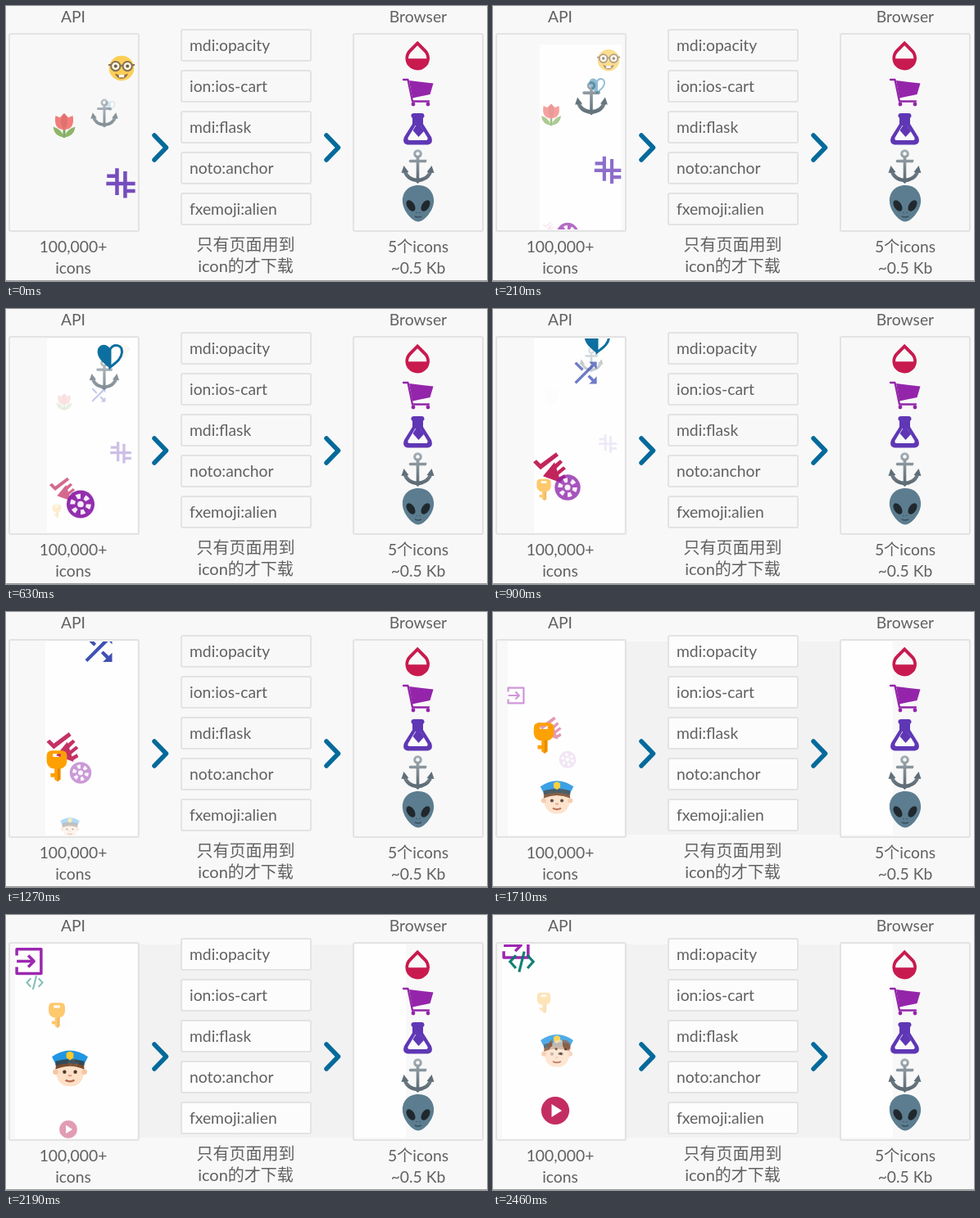
Animation, 587 px wide and 336 px high, one loop 2.56 s. Source, as an HTML page:

```html
<!DOCTYPE html>
<html lang="zh">
<head>
<meta charset="utf-8">
<title>Icons on demand</title>
<style>
  html, body { margin: 0; width: 100%; height: 100%; overflow: hidden; background: #f8f8f8; }
  svg { display: block; }
  text { font: 19.3px Lato, "Noto Sans CJK SC", "Noto Sans CJK", sans-serif; fill: #616161; }
  .mid text { text-anchor: middle; }
  .cjk text { font-size: 20px; }
  .box { fill: none; stroke: #e3e3e3; stroke-width: 2; }
  .lit .row { fill: #fcfcfc; }
  .band { visibility: hidden; }
  .lit .band { visibility: visible; }
  .line { fill: none; stroke: currentColor; stroke-linecap: round; stroke-linejoin: round; }
</style>
</head>
<body>
<svg id="stage" width="587" height="336" viewBox="0 0 587 336">
  <defs>
    <clipPath id="panel"><rect x="5" y="36" width="156" height="237"/></clipPath>
    <linearGradient id="steel" gradientUnits="userSpaceOnUse" x1="0" y1="-20" x2="0" y2="20">
      <stop offset="0" stop-color="#a3aeb5"/><stop offset="1" stop-color="#56656f"/>
    </linearGradient>

    <g id="nerd">
      <circle r="19" fill="#fcc535"/>
      <g fill="#fff6dc" stroke="#6b5130" stroke-width="2.5">
        <circle cx="-9" cy="-3" r="7"/><circle cx="9" cy="-3" r="7"/>
        <path d="M-20 -5h4M16 -5h4M-2 -4h4"/>
      </g>
      <g fill="#4e3b27"><circle cx="-9" cy="-3" r="2.5"/><circle cx="9" cy="-3" r="2.5"/></g>
      <path d="M-10 8Q0 13 10 8Q7 16 0 16T-10 8" fill="#7a4a20"/>
      <path d="M-4 10h8v4h-8z" fill="#fff"/>
    </g>
    <g id="tulip">
      <path d="M-2 0h4v20h-4z" fill="#558b2f"/>
      <path d="M0 19Q-16 18 -18 2Q-5 5 0 19Q5 5 18 2Q16 18 0 19" fill="#689f38"/>
      <path d="M-14 -16L-7 -13L0 -20L7 -13L14 -16Q18 6 0 7Q-18 6 -14 -16" fill="#ef5350"/>
      <path d="M0 -20Q11 -7 0 7Q-11 -7 0 -20" fill="#d9443f"/>
    </g>
    <g id="anchor" fill="none" stroke="url(#steel)" stroke-width="4.5">
      <circle cy="-15.5" r="3.8" stroke-width="3"/>
      <path d="M-9 -6.5H9L9 -6.4" stroke-width="3.6" stroke-linecap="round"/>
      <path d="M-1.8 -12H1.8V17H-1.8z" fill="url(#steel)" stroke="none"/>
      <path d="M-16 5Q-13 16 0 17Q13 16 16 5"/>
      <path d="M-20 8L-17 -1L-11 7zM20 8L17 -1L11 7zM-6 16H6L0 21z" fill="#5f6f79" stroke="none"/>
    </g>
    <g id="heart" color="#0d6f9f">
      <path d="M0 -11C-5 -20 -19 -18 -18 -5C-17 5 -7 11 0 18z" fill="currentColor"/>
      <path d="M0 -10C5 -19 18 -17 17 -5C16 5 7 10 0 16z" fill="#fff" stroke="currentColor" stroke-width="3.5"/>
    </g>
    <g id="align" class="line" color="#673ab7" stroke-width="5">
      <path d="M-5 -17V14M6 -13V18M-16 -9H-5M-17 1H17M6 11H17" stroke-linecap="square"/>
    </g>
    <g id="check" fill="#c2255c">
      <path d="M-18 -6L-14 -9L-9 -4L10 -18L13 -14L-9 3z"/>
      <path d="M-6 11L8 -6L16 19z"/>
      <path d="M4 0L15 -9L18 -6L8 4zM9 7L19 -1L22 2L11 11zM11 14L20 9L22 13L14 18z"/>
    </g>
    <g id="wheel" fill="none" stroke="#f7eefa">
      <circle r="20" fill="#8e24aa" stroke="none"/>
      <circle r="11.5" stroke-width="7" stroke-dasharray="1" pathLength="12"/>
      <circle r="4.5" fill="#f7eefa" stroke="none"/>
    </g>
    <path id="shuffle" fill="#3f51b5" transform="scale(2.5) translate(-12 -12)" d="M10.6 9.2L5.4 4L4 5.4L9.2 10.6zM14.5 4L16.5 6L4 18.6L5.4 20L18 7.5L20 9.5V4zM14.8 13.4L13.4 14.8L16.5 18L14.5 20H20V14.5L18 16.5z"/>
    <g id="key" fill="#ffa000">
      <path fill-rule="evenodd" d="M-6 -20H6Q13 -20 13 -13V-6Q12 1 6 3H5V17L1 20L-3 17V14H-8V9H-3V3H-6Q-12 1 -13 -6V-13Q-13 -20 -6 -20M-5 -16V-12H5V-16z"/>
      <path d="M1 3H4V17L1 20z" fill="#e68900"/>
    </g>
    <g id="police">
      <path d="M-16 -8Q-18 20 0 20T16 -8z" fill="#ffe0c7"/>
      <g fill="#f5c6a5"><circle cx="-16" cy="4" r="3"/><circle cx="16" cy="4" r="3"/></g>
      <path d="M-15 -6Q0 -13 15 -6L16 1Q0 -6 -16 1z" fill="#7a4b2d"/>
      <path d="M-16 -5L-20 -13Q0 -27 20 -13L16 -5Q0 -11 -16 -5" fill="#2196e3"/>
      <path d="M-16 -8Q0 -13 16 -8V-3Q0 -8 -16 -3z" fill="#334a59"/>
      <path d="M-4 -17L0 -19L4 -17V-12L0 -9L-4 -12z" fill="#ffca28"/>
      <g fill="#4e3a30"><circle cx="-6" cy="4" r="2"/><circle cx="6" cy="4" r="2"/></g>
      <path d="M-2 8H2" stroke="#e4a184" stroke-width="2"/>
      <path d="M-5 13Q0 16 5 13" fill="none" stroke="#b5654a" stroke-width="2"/>
    </g>
    <g id="login" class="line" color="#9c27b0" stroke-width="4">
      <path d="M-17 -8V-17H17V17H-17V8M-17 0H6M-1 -8L7 0L-1 8" stroke-linecap="butt"/>
    </g>
    <g id="code" class="line" color="#00796b" stroke-width="4">
      <path d="M-9 -10L-18 0L-9 10M9 -10L18 0L9 10M4 -16L-4 16" stroke-linecap="butt" stroke-linejoin="miter"/>
    </g>
    <g id="dog">
      <ellipse cy="3" rx="16" ry="16" fill="#fbe6d6"/>
      <path d="M3 -13Q16 -14 16 0Q9 7 4 -3z" fill="#a3582b"/>
      <path d="M-12 -13Q-20 -10 -18 2L-12 -4z" fill="#a3582b"/>
      <g fill="#3b2a22"><circle cx="-6" cy="1" r="2"/><circle cx="8" cy="1" r="2"/><ellipse cy="8" rx="3" ry="2"/></g>
    </g>
    <g id="play"><circle r="19" fill="#c2255c"/><path d="M-5 -9L9 0L-5 9z" fill="#fff"/></g>
  </defs>

  <rect width="587" height="336" fill="#f8f8f8"/>
  <g class="band">
    <path d="M163 36H423V272H163z" fill="#f2f2f2"/>
    <path d="M425 36H488V272H425z" fill="#fefefe"/>
  </g>
  <rect id="wash" fill="#fefefe"/>
  <g id="flow" clip-path="url(#panel)"></g>
  <rect class="box" x="4" y="34" width="158" height="241" rx="2"/>
  <rect class="box" x="424" y="34" width="158" height="241" rx="2"/>
  <g id="rows"></g>

  <g class="line" color="#036a9b" stroke-width="5.5">
    <path d="M181 158L195.5 173L181 188M391 158L405.5 173L391 188"/>
  </g>

  <g class="mid">
    <text x="82" y="20">API</text>
    <text x="503" y="20">Browser</text>
    <text x="82" y="301">100,000+</text>
    <text x="82" y="327">icons</text>
    <text x="503" y="301">5个icons</text>
    <text x="503" y="327">~0.5 Kb</text>
    <g class="cjk">
      <text x="292.5" y="299">只有页面用到</text>
      <text x="292.5" y="325">icon的才下载</text>
    </g>
  </g>

  <path transform="translate(480 38.4) scale(1.85)" fill="#c81a4f" fill-rule="evenodd" d="M17.66 8L12 2.35L6.34 8C4.78 9.56 4 11.64 4 13.64S4.78 17.75 6.34 19.31S9.95 21.66 12 21.66S16.1 20.87 17.66 19.31S20 15.64 20 13.64S19.22 9.56 17.66 8M6 14C6 12 6.62 10.73 7.76 9.6L12 5.27L16.24 9.65C17.38 10.77 18 12 18 14z"/>
  <g color="#9425aa" fill="currentColor">
    <path class="line" stroke-width="2.3" d="M485 90H490.5L496 116.5H516"/>
    <path d="M492 91L521.5 94.5L517.5 108L496 112.5z"/>
    <circle cx="497" cy="120" r="2.4"/><circle cx="515" cy="120" r="2.4"/>
  </g>
  <g fill="#5f37b5">
    <path d="M498 131H507Q511 131 510.5 135L509 137V144L519 160Q522 168 515 169.500H490Q483 168 486 160L496 144V137L494.500 135Q494 131 498 131"/>
    <path d="M499.500 146H505.500L514.500 161Q515 164 513 164H492Q490 164 490.500 161z" fill="#fafafa"/>
    <path d="M501 145H505L510 153L503.500 160L496.500 152z"/>
  </g>
  <use href="#anchor" transform="translate(502.5 196)"/>
  <g transform="translate(503 241)">
    <path d="M0 -22C14 -22 20 -11 19 -1C18 10 7 22.500 0 22.500S-18 10 -19 -1C-20 -11 -14 -22 0 -22" fill="#5c7d90"/>
    <g fill="#20282d">
      <ellipse rx="4.4" ry="7.6" transform="translate(-9 3) rotate(-33)"/>
      <ellipse rx="4.4" ry="7.6" transform="translate(9 3) rotate(33)"/>
    </g>
    <path d="M-2 11v1M2 11v1M-4 16Q0 18 4 16" fill="none" stroke="#37505e" stroke-width="1.5"/>
  </g>
  <path d="M0 335.5H587" stroke="#9a9a9a"/>
</svg>

<script>
const LOOP = 2560, NEVER = [9000, 9900], GONE = [-900, -600];
const $ = id => document.getElementById(id);
const add = (parent, tag, attrs) => {
  const el = document.createElementNS("http://www.w3.org/2000/svg", tag);
  for (const k in attrs) el.setAttribute(k, attrs[k]);
  return parent.appendChild(el);
};

["mdi:opacity", "ion:ios-cart", "mdi:flask", "noto:anchor", "fxemoji:alien"].forEach((name, i) => {
  const y = 29 + 50 * i;
  add($("rows"), "rect", { class: "box row", x: 214, y, width: 158, height: 38, rx: 2 });
  add($("rows"), "text", { x: 224, y: y + 26 }).textContent = name;
});

// Each icon passes (x, y) at time `at`, rising at `v` px/s slowed by `k`;
// it grows in over `rise` and shrinks away over `fall`.
const icons = [];
const icon = (id, size, at, x, y, v, k, rise, fall = NEVER) =>
  icons.push({ el: add($("flow"), "use", { href: "#" + id }), size, at, x, y, v, k, rise, fall });

icon("nerd", 35, 0, 141, 76, 50, 16, GONE, [-300, 800]);
icon("tulip", 34, 0, 71, 146, 68, 26, GONE, [-500, 1000]);
icon("align", 38, 0, 140, 216, 82, 27, GONE, [-300, 1200]);
icon("anchor", 41, 0, 120, 131, 91, 16, [-700, 250], [300, 1300]);
icon("heart", 34, 0, 127, 122, 126, 38, [-100, 580], [1150, 1300]);
icon("check", 40, 390, 67, 247, 121, 31, [150, 850], [1100, 2250]);
icon("wheel", 35, 390, 91, 260, 96, 27, [-250, 440], [390, 2050]);
icon("shuffle", 33, 900, 113, 78, 96, 15, [450, 1050], [1500, 1650]);
icon("key", 38, 900, 62, 221, 93, 13, [500, 1200], [1600, 2900]);
icon("police", 44, 1270, 78, 263, 84, 2, [1000, 1800], [2150, 3200]);
icon("login", 35, 1710, 28, 102, 109, 30, [1400, 2050]);
icon("code", 33, 1950, 35, 107, 105, 14, [1900, 2500]);
icon("dog", 44, 2460, 82, 163, 60, 0, [2150, 2650]);
icon("play", 37, 2460, 76, 239, 85, 0, [1950, 2480]);

const ramp = (t, [a, b]) => Math.min(1, Math.max(0, (t - a) / (b - a)));
const smooth = u => u * u * (3 - 2 * u);

function place(o, t) {
  const s = (t - o.at) / 1000;
  const y = o.y - o.v * s + o.k * s * s;
  const up = ramp(t, o.rise), left = 1 - smooth(ramp(t, o.fall));
  const scale = o.size / 40 * (.3 + .7 * up) * (.55 + .45 * left);
  o.el.setAttribute("transform", `translate(${o.x} ${y}) scale(${scale})`);
  o.el.setAttribute("opacity", up * left);
}

// The white backing of the left panel widens in jumps.
const edges = [[30, 57], [570, 50], [1110, 48], [1640, 18], [1900, 12], [2190, 11]];

function draw(t) {
  icons.forEach(o => place(o, t));
  const edge = edges.filter(e => t >= e[0]).pop();
  const x = edge ? edge[1] : 160, y = t < 570 ? 47 : 36;
  const right = t < 570 ? 157 : 160;
  const wash = { x, y, width: Math.max(0, right - x), height: 273 - y };
  for (const k in wash) $("wash").setAttribute(k, wash[k]);
  $("stage").classList.toggle("lit", t >= 1640);
}

function tick() {
  const t = performance.now() % LOOP;
  const held = t >= 1270 && t < 1370;
  draw(held ? 1270 : Math.min(2460, Math.floor(t / 30) * 30));
  requestAnimationFrame(tick);
}
tick();
</script>
</body>
</html>
```
